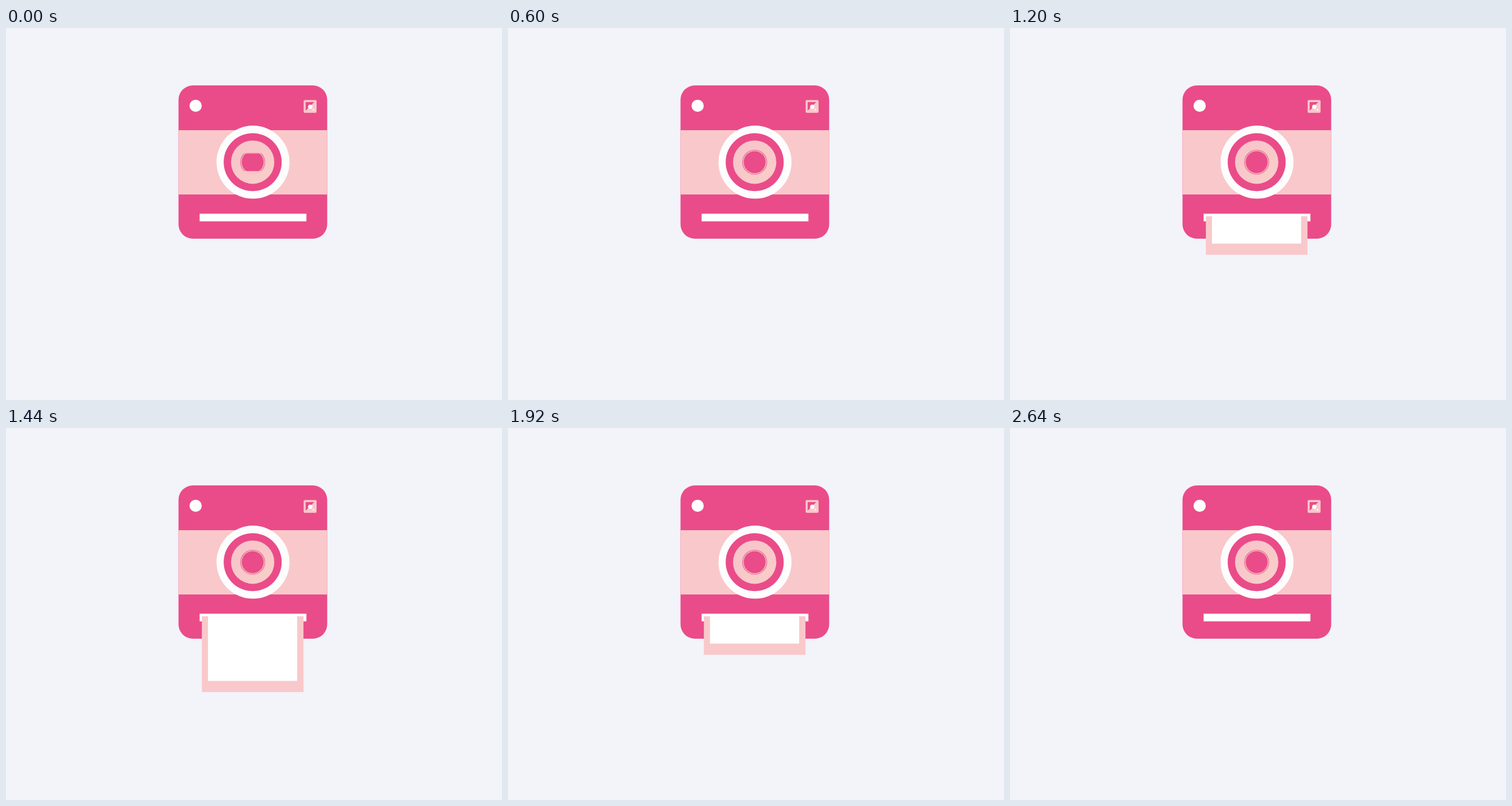
An HTML page for the animation above (3 s loop, 864x648 px).

```html
<!DOCTYPE html>
<html lang="en">
<head>
<meta charset="utf-8">
<title>Instant camera</title>
<style>
  html, body { margin: 0; width: 100%; height: 100%; overflow: hidden; background: #f3f3fa; }
  svg { display: block; width: 864px; height: 648px; }
  .pink { fill: #ea4c89; }
  .pale { fill: #f9c8ca; }
  .white { fill: #fff; }
</style>
</head>
<body>
<svg viewBox="0 0 864 648">
  <defs>
    <linearGradient id="glass" x1="0" y1="0" x2="1" y2="1">
      <stop offset="0" stop-color="#f7c2cb"/>
      <stop offset="1" stop-color="#f9cfc8"/>
    </linearGradient>
    <clipPath id="body"><rect x="300.5" y="100" width="259" height="267" rx="25"/></clipPath>
    <clipPath id="iris"><circle cx="429.7" cy="233.7" r="22.3"/></clipPath>
    <clipPath id="exit"><rect x="330" y="328" width="200" height="200"/></clipPath>
  </defs>

  <g clip-path="url(#body)">
    <rect class="pink" x="300" y="100" width="260" height="268"/>
    <rect class="pale" x="300" y="178" width="260" height="112"/>
  </g>
  <circle class="white" cx="330.4" cy="135.5" r="10.6"/>

  <!-- viewfinder -->
  <rect class="pale" x="518.5" y="125.5" width="22.5" height="22.2" rx="2"/>
  <path class="pink" d="M522 129H537L522 144Z"/>
  <circle class="white" cx="530" cy="137.2" r="3.8"/>
  <circle class="white" cx="535.6" cy="142.2" r="1.5"/>

  <!-- lens -->
  <circle cx="430.3" cy="233.7" r="63.6" fill="#fdfdfd"/>
  <circle class="pink" cx="429.7" cy="233.7" r="50.5"/>
  <circle cx="429.7" cy="233.7" r="37.7" fill="url(#glass)"/>
  <circle cx="429.7" cy="233.7" r="21" fill="none" stroke="#ea7d99" stroke-width="1.6"/>
  <circle class="pink" cx="429.7" cy="233.7" r="19.2"/>
  <g clip-path="url(#iris)" fill="#f9c6c5">
    <rect id="lidTop" x="400" y="181.5" width="60" height="30"/>
    <rect id="lidBottom" x="400" y="255.5" width="60" height="30"/>
  </g>

  <!-- slot and print -->
  <rect class="white" x="337.3" y="323.5" width="186" height="13.3"/>
  <g clip-path="url(#exit)">
    <g id="print">
      <rect class="pale" x="341.2" y="328" width="177" height="132"/>
      <rect class="white" x="351.8" y="320" width="155.4" height="120.6"/>
    </g>
  </g>
</svg>
<script>
const LOOP = 3000;

// steps: [time in ms, vertical offset], each held until the next
function play(id, steps, sign = 1) {
  const frames = steps.map(([time, y]) => ({
    offset: time / LOOP,
    transform: `translateY(${sign * y}px)`,
    easing: 'step-end'
  }));
  frames.push({ ...frames[frames.length - 1], offset: 1 });
  document.getElementById(id).animate(frames, { duration: LOOP, iterations: Infinity });
}

const blink = [[0, 6.5], [120, 13], [240, 19.5], [360, 13], [480, 6.5], [600, 0]];
play('lidTop', blink);
play('lidBottom', blink, -1);

// the print slides out and returns along the same positions
const slide = [-132, -124, -116, -108, -86.5, -65, -32.5, 0];
const out = slide.map((y, i) => [600 + i * 120, y]);
const back = slide.slice(0, -1).reverse().map((y, i) => [1800 + i * 120, y]);
play('print', [[0, -132], ...out, ...back]);
</script>
</body>
</html>
```
